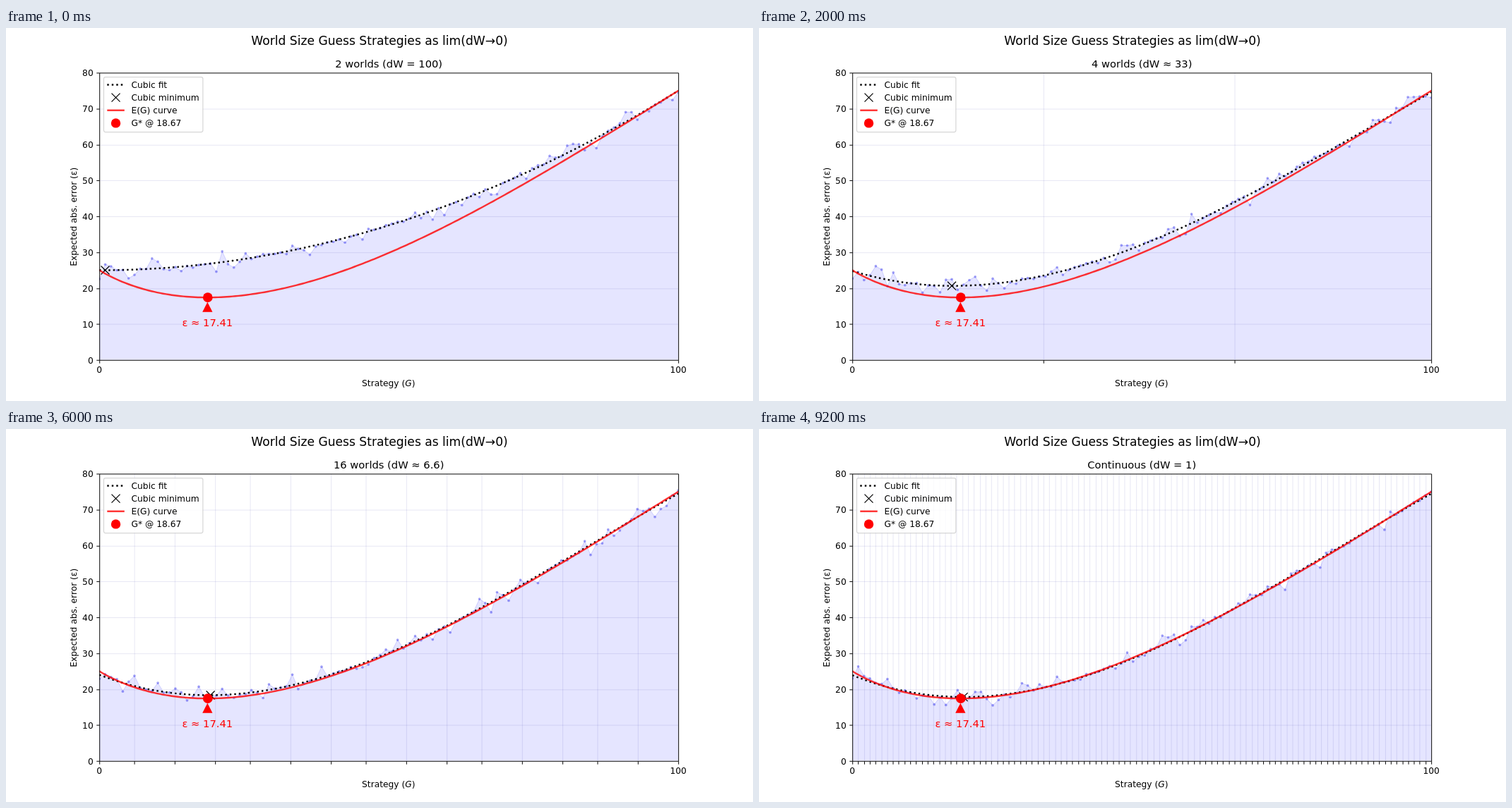
Write an HTML page that moves like this. It is 1058 px wide and 529 px high and loops after 10000 ms.

```html
<!DOCTYPE html>
<html lang="en">
<head>
<meta charset="utf-8">
<title>World Size Guess Strategies</title>
<style>
  html, body { margin: 0; width: 100%; height: 100%; overflow: hidden; background: #fff; }
  svg { display: block; width: 1058px; height: 529px; }
  text { font: 13.89px "DejaVu Sans", sans-serif; white-space: pre; text-anchor: middle; }
  .head { font-size: 19.44px; }
  .title { font-size: 16.67px; }
  .start { text-anchor: start; }
  .end { text-anchor: end; }
  path { fill: none; }
  .axis { stroke: #000; stroke-width: 1.11; }
  .grid { stroke: rgba(0, 0, 139, .1); stroke-width: 1.11; }
  .area { fill: rgba(0, 0, 255, .1); }
  .link { stroke: rgba(0, 0, 255, .14); stroke-width: 1.2; }
  .dot { fill: rgba(0, 0, 230, .35); }
  .fit { stroke: #000; stroke-width: 2.78; stroke-dasharray: 2.78 4.58; }
  .cross { stroke: #000; stroke-width: 1.39; }
  .curve { stroke: rgba(255, 0, 0, .8); stroke-width: 2.78; stroke-linecap: square; }
  .best { fill: #f00; }
  .legend { fill: rgba(255, 255, 255, .8); stroke: rgba(204, 204, 204, .8); stroke-width: 1.39; }
  .stage { visibility: hidden; animation: show 10s step-end infinite; }
  @keyframes show {
    0% { visibility: visible; }
    20%, 100% { visibility: hidden; }
  }
</style>
</head>
<body>
<svg id="chart" viewBox="0 0 1200 600">
  <clipPath id="plot"><rect x="150" y="72" width="930" height="462"/></clipPath>
</svg>
<script>
const chart = document.getElementById('chart');
const X = g => 150 + 9.3 * g;
const Y = v => 534 - 5.775 * v;
const snap = p => Math.round(p) + 0.5;
const range = (n, f) => Array.from({ length: n }, (_, i) => f(i));
const mean = list => list.reduce((a, b) => a + b) / list.length;

function add(parent, tag, attrs, content) {
  const node = document.createElementNS('http://www.w3.org/2000/svg', tag);
  for (const key in attrs) node.setAttribute(key, attrs[key]);
  if (content !== undefined) node.textContent = content;
  parent.append(node);
  return node;
}
const path = (parent, cls, d) => add(parent, 'path', { class: cls, d });
const label = (parent, cls, x, y, s) => add(parent, 'text', { class: cls, x, y }, s);
const clipped = parent => add(parent, 'g', { 'clip-path': 'url(#plot)' });
const trace = points => 'M' + points.map(([g, v]) => `${X(g).toFixed(2)},${Y(v).toFixed(2)}`).join('L');
const plot = f => trace(range(201, i => [i / 2, f(i / 2)]));
const cross = (x, y, r = 6.8) => `M${x - r},${y - r}l${2 * r},${2 * r}m0,${-2 * r}l${-2 * r},${2 * r}`;

function random(seed) {
  return () => {
    seed = (seed * 16807) % 2147483647;
    return seed / 2147483647;
  };
}

// Expected |g - x| for x uniform in [0, W], W uniform in [0, 100]
function limitError(g) {
  const p = g / 100;
  return p ? 100 * (0.25 - p + 1.5 * p * p - p * p * Math.log(p)) : 25;
}

// The same with W limited to n evenly spaced worlds
function worldError(g, n) {
  return mean(range(n, i => {
    const w = 100 * i / (n - 1);
    return g < w ? w / 2 - g + g * g / w : g - w / 2;
  }));
}

// Least-squares cubic on [0, 100], projected on shifted Legendre polynomials
function cubicFit(f) {
  const basis = [
    () => 1,
    p => 2 * p - 1,
    p => 6 * p * p - 6 * p + 1,
    p => 20 * p ** 3 - 30 * p * p + 12 * p - 1,
  ];
  const nodes = range(400, i => (i + 0.5) / 400);
  const weights = basis.map((b, k) => (2 * k + 1) * mean(nodes.map(p => f(100 * p) * b(p))));
  return g => basis.reduce((sum, b, k) => sum + weights[k] * b(g / 100), 0);
}

const stages = [
  ['2 worlds (dW = 100)', 2],
  ['4 worlds (dW ≈ 33)', 4],
  ['8 worlds (dW ≈ 14.3)', 8],
  ['16 worlds (dW ≈ 6.6)', 16],
  ['Continuous (dW = 1)', 101],
];

function drawStage([title, worlds], index) {
  const group = add(chart, 'g', { class: 'stage', style: `animation-delay:${2 * index - 10}s` });
  const inner = clipped(group);
  const error = g => worldError(g, worlds);
  const fit = cubicFit(error);
  const noise = random(4211 + 977 * index);
  const guesses = range(100, k => k * 100 / 99);
  // Cubed noise: mostly small, now and then a spike
  const samples = guesses.map(g => [g, error(g) + 3 * (2 * noise() - 1) ** 3]);
  const line = trace(samples);
  path(inner, 'area', `${line}L${X(100)},${Y(0)}L${X(0)},${Y(0)}Z`);

  const columns = range(worlds, i => snap(X(Math.floor(100 * i / (worlds - 1))))).slice(1, -1);
  for (const x of columns) path(inner, 'grid', `M${x},72V534`);
  for (let v = 10; v < 80; v += 10) path(inner, 'grid', `M150,${snap(Y(v))}H1080`);

  path(inner, 'link', line);
  for (const [g, v] of samples) add(inner, 'circle', { class: 'dot', cx: X(g), cy: Y(v), r: 2.1 });
  path(inner, 'fit', plot(fit));
  const lowest = guesses.slice(1).reduce((a, b) => fit(b) < fit(a) ? b : a);
  path(group, 'cross', cross(X(lowest), Y(fit(lowest))));
  path(group, 'axis', columns.map(x => `M${x},534.5v5`).join(''));
  label(group, 'title', 615, 64, title);
}

function drawBest() {
  const x = X(18.67);
  path(clipped(chart), 'curve', plot(limitError));
  add(chart, 'circle', { class: 'best', cx: x + 0.5, cy: Y(17.41), r: 7.8 });
  path(chart, 'best', `M${x},440.8l8.1,16.1h-16.2z`);
  label(chart, 'title best', x, 479.9, 'ε ≈ 17.41');
}

function drawAxes() {
  path(chart, 'axis', 'M150.5,72.5H1080.5V534.5H150.5ZM150.5,534.5v5M1080.5,534.5v5');
  for (let v = 0; v <= 80; v += 10) {
    path(chart, 'axis', `M150.5,${snap(Y(v))}h-5`);
    label(chart, 'end', 140.3, Y(v) + 5.5, v);
  }
  for (const g of [0, 100]) label(chart, '', X(g), 555.2, g);
  const strategy = label(chart, '', 614.5, 576.2, 'Strategy (');
  add(strategy, 'tspan', { 'font-style': 'italic' }, 'G');
  add(strategy, 'tspan', {}, ')');
  add(chart, 'text', { transform: 'translate(113.8 303.7) rotate(-90)' }, 'Expected abs. error (ε)');
  label(chart, 'head', 600, 27.2, 'World Size Guess Strategies as lim(dW→0)');
}

function drawLegend() {
  add(chart, 'rect', { class: 'legend', x: 157, y: 79, width: 159.3, height: 88.4, rx: 2.8 });
  const row = i => 91.2 + 20.6 * i;
  path(chart, 'fit', `M162.5,${row(0)}h27.8`);
  path(chart, 'cross', cross(176.4, row(1)));
  path(chart, 'curve', `M163.9,${row(2)}h25`);
  add(chart, 'circle', { class: 'best', cx: 176.4, cy: row(3), r: 7.6 });
  ['Cubic fit', 'Cubic minimum', 'E(G) curve', 'G* @ 18.67'].forEach((s, i) =>
    label(chart, 'start', 201.4, row(i) + 4.8, s));
}

stages.forEach(drawStage);
drawBest();
drawAxes();
drawLegend();
</script>
</body>
</html>
```
